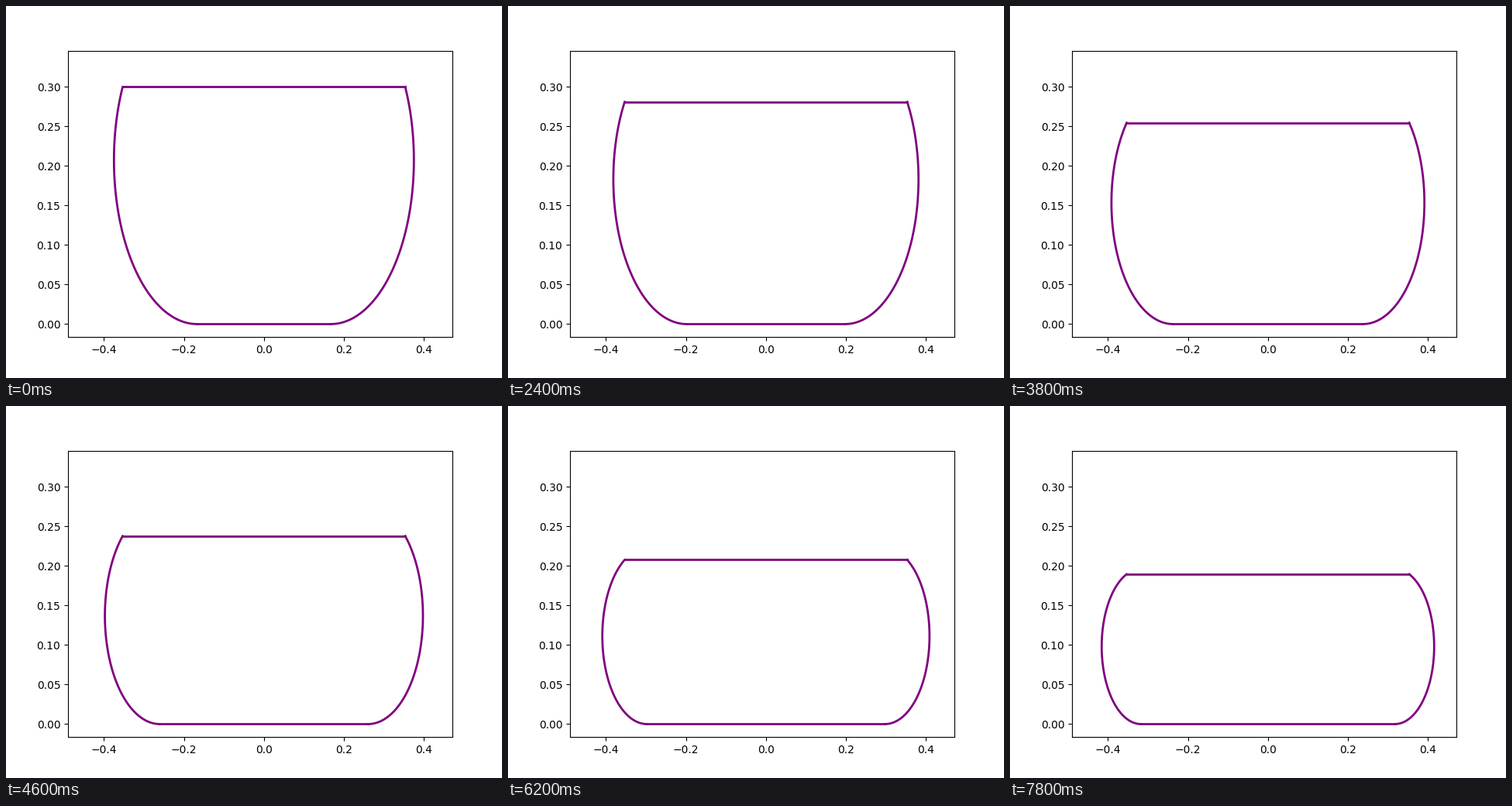
Write a matplotlib script that moves like this. It is 640x480 px and loops after 8000 ms.

```python
import numpy as np
import matplotlib.pyplot as plt
from matplotlib.animation import FuncAnimation

# A weight resting on a soft shell: flat top and bottom, circular sides,
# constant shell length.
HALF_TOP = 0.353
HALF_LENGTH = 3 * np.pi / 16
MASS, PRESSURE, GRAVITY = 100.0, 2000.0, 10.0
START_HEIGHT = 0.3
FRAMES, INTERVAL = 40, 200
STEP, SUBSTEPS = 1.5 / 149, 100

# Side arcs sweep `angle` from the bottom tangent point up to the lid.
angles = np.linspace(1.8, 3.1, 4000)
radii = (HALF_LENGTH - HALF_TOP) / (angles - np.sin(angles))
lid_heights = radii * (1 - np.cos(angles))


def shape(height):
    """Return sweep angle, side radius and half width of the flat bottom."""
    angle = np.interp(-height, -lid_heights, angles)
    radius = height / (1 - np.cos(angle))
    return angle, radius, HALF_TOP - radius * np.sin(angle)


def simulate(count):
    height, speed = START_HEIGHT, 0.0
    dt = STEP / SUBSTEPS
    heights = [height]
    for _ in range(count - 1):
        for _ in range(SUBSTEPS):
            contact = 2 * shape(height)[2]
            speed += (PRESSURE * contact / MASS - GRAVITY) * dt
            height += speed * dt
        heights.append(height)
    return heights


heights = simulate(FRAMES - 1)

fig, ax = plt.subplots(figsize=(6.4, 4.8), dpi=100)
ax.set_xlim(-0.4896, 0.4710)
ax.set_ylim(-0.01647, 0.34588)
lid, base, left, right = (
    ax.plot([], [], color="purple", linewidth=2)[0] for _ in range(4)
)


def update(frame):
    height = heights[max(frame - 1, 0)]
    angle, radius, half_base = shape(height)
    sweep = np.linspace(0, angle, 100)
    x = half_base + radius * np.sin(sweep)
    y = radius * (1 - np.cos(sweep))
    lid.set_data([-HALF_TOP, HALF_TOP], [height, height])
    base.set_data([-half_base, half_base], [0, 0])
    left.set_data(-x, y)
    right.set_data(x, y)
    return lid, base, left, right


anim = FuncAnimation(fig, update, frames=FRAMES, interval=INTERVAL,
                     repeat=True, repeat_delay=0)
plt.show()
```
